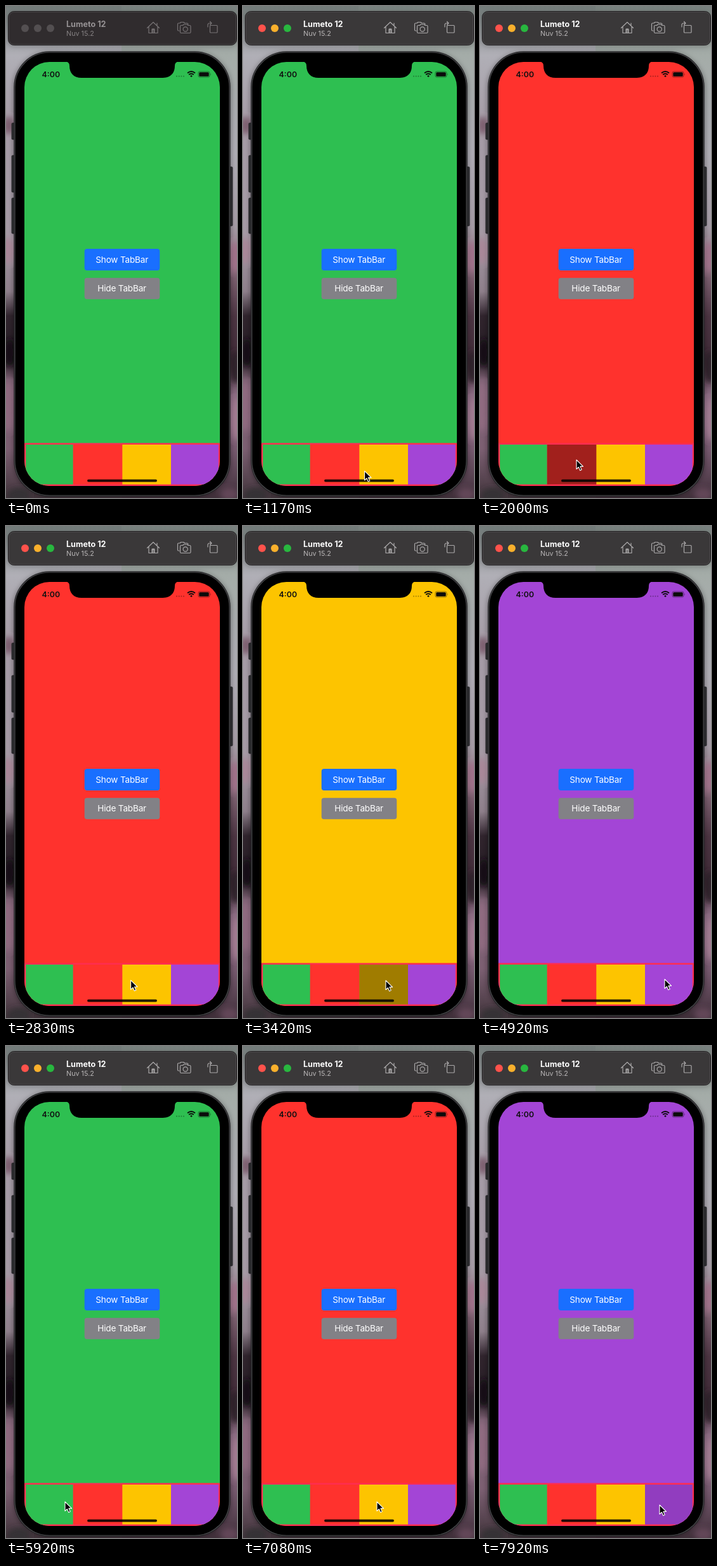
These frames come from a looping animation (364x774 px, 8000 ms). An HTML page:

```html
<!DOCTYPE html>
<html lang="en">
<head>
<meta charset="utf-8">
<title>Tab bar demo</title>
<style>
  html, body { margin: 0; width: 100%; height: 100%; overflow: hidden; background: #8d878c; }
  svg { display: block; width: 364px; height: 774px; font-family: Inter, Roboto, sans-serif; }
</style>
</head>
<body>
<svg viewBox="0 0 364 774">
  <defs>
    <linearGradient id="left" x2="0" y2="1">
      <stop offset="0" stop-color="#727b79"/>
      <stop offset=".1" stop-color="#b0afb6"/>
      <stop offset=".24" stop-color="#a69ca7"/>
      <stop offset=".46" stop-color="#a59aa5"/>
      <stop offset=".58" stop-color="#8f808c"/>
      <stop offset=".63" stop-color="#30242d"/>
      <stop offset=".72" stop-color="#251c23"/>
      <stop offset=".76" stop-color="#7c6073"/>
      <stop offset=".9" stop-color="#7c5f72"/>
      <stop offset="1" stop-color="#41343b"/>
    </linearGradient>
    <linearGradient id="right" x2="0" y2="1">
      <stop offset="0" stop-color="#77807d"/>
      <stop offset=".1" stop-color="#a4aca8"/>
      <stop offset=".3" stop-color="#afadb5"/>
      <stop offset=".45" stop-color="#a59ba5"/>
      <stop offset=".52" stop-color="#8f7081"/>
      <stop offset=".63" stop-color="#4d3543"/>
      <stop offset=".72" stop-color="#402b37"/>
      <stop offset=".79" stop-color="#8b6b82"/>
      <stop offset=".9" stop-color="#785a70"/>
      <stop offset="1" stop-color="#40303a"/>
    </linearGradient>
    <filter id="soft" x="-20%" y="-20%" width="140%" height="140%"><feGaussianBlur stdDeviation="4"/></filter>
    <clipPath id="glass"><rect x="29" y="88" width="308" height="667" rx="39.500"/></clipPath>
  </defs>

  <rect width="182" height="774" fill="url(#left)"/>
  <rect x="182" width="182" height="774" fill="url(#right)"/>
  <g filter="url(#soft)">
    <ellipse cx="4" cy="188" rx="8" ry="14" fill="#7d5f70"/>
    <ellipse cx="2" cy="385" rx="10" ry="20" fill="#a98799"/>
    <ellipse cx="6" cy="545" rx="10" ry="22" fill="#151015"/>
    <ellipse cx="2" cy="630" rx="12" ry="40" fill="#8f6b80"/>
    <ellipse cx="362" cy="395" rx="9" ry="24" fill="#a0728a"/>
    <ellipse cx="362" cy="568" rx="9" ry="26" fill="#2d2029"/>
    <ellipse cx="364" cy="650" rx="9" ry="34" fill="#a27c92"/>
    <ellipse cx="20" cy="770" rx="18" ry="12" fill="#343234"/>
    <ellipse cx="352" cy="768" rx="14" ry="10" fill="#634759"/>
    <rect x="12" y="73" width="342" height="699" rx="56" fill-opacity=".4"/>
    <rect x="3" y="10" width="360" height="53" rx="9" fill-opacity=".25"/>
  </g>

  <g id="toolbar">
    <rect x="3.500" y="8.500" width="360" height="53" rx="9" stroke="#1c1a1b"/>
    <rect x="4.500" y="9.500" width="358" height="51" rx="8" fill="none" stroke="#5b585a" stroke-opacity=".6"/>
    <g id="lights"></g>
    <text id="title" x="95" y="33" font-size="12.600" font-weight="700">Lumeto 12</text>
    <text id="subtitle" x="95" y="47" font-size="10.800">Nuv 15.2</text>
    <g id="icons" fill="none" stroke-width="1.200" stroke-linejoin="round" stroke-linecap="round">
      <path d="M222.500 34.500L232 25.500L241.500 34.500M225 33V42.500H239V33M238 27V30.500"/>
      <path d="M230.500 42V36.500H233.500V42" stroke-width="2"/>
      <path d="M273 39H272Q270.500 39 270.500 37.500V28.500Q270.500 27 272 27H274L275.500 25.500H280L281.500 27H285.500Q287 27 287 29"/>
      <path d="M276 30.500H278.500L280 29H285.500L287 30.500H289.500Q291 30.500 291 32V41Q291 42.500 289.500 42.500H276Q274.500 42.500 274.500 41V32Q274.500 30.500 276 30.500Z"/>
      <circle cx="282.700" cy="36.500" r="3.600"/>
      <rect x="321.500" y="30.500" width="11.500" height="11.500" rx="1"/>
      <path d="M318 33V30Q318 27 321 27H324M321.500 24.500L324 27L321.500 29.500"/>
    </g>
  </g>

  <g fill="#2c2c2f" stroke="#1b1b1d" stroke-width=".7">
    <rect x="9" y="184" width="6" height="26" rx="1.500"/>
    <rect x="9" y="235" width="6" height="58" rx="1.500"/>
    <rect x="9" y="302" width="6" height="56" rx="1.500"/>
    <rect x="351" y="253" width="6" height="93" rx="1.500"/>
  </g>
  <rect x="12.300" y="71.300" width="341.400" height="700.400" rx="56" fill="#222224"/>
  <rect x="14" y="73" width="338" height="697" rx="54.500" stroke="#48484b" stroke-width="1.200"/>

  <g clip-path="url(#glass)">
    <rect id="page" x="29" y="88" width="308" height="667"/>
    <rect x="29" y="687.500" width="308" height="67.500" fill="#ff2d50"/>
    <g id="tabs"></g>
    <rect id="dim" y="690" height="62.600"/>
    <rect x="128" y="744.700" width="110" height="4" rx="2" fill="#000" fill-opacity=".85"/>
  </g>
  <path d="M94 87.500Q100 88 100 94C100 106 107 113 119 113H247C259 113 266 106 266 94Q266 88 272 87.500Z"/>

  <text x="56.500" y="112" font-size="12.400" font-weight="600" fill="#101010">4:00</text>
  <g fill="#000" fill-opacity=".35">
    <circle cx="269" cy="110.500" r="1"/><circle cx="272.700" cy="110.500" r="1"/>
    <circle cx="276.400" cy="110.500" r="1"/><circle cx="280" cy="110.500" r="1"/>
  </g>
  <g fill="none" stroke="#0b0b0b" stroke-width="1.900">
    <path d="M286 105.500Q292 100.500 298 105.500M288.200 108Q292 104.800 295.800 108"/>
    <path d="M292 111.500L290.700 110Q292 109 293.300 110Z" stroke-width="1" fill="#0b0b0b"/>
  </g>
  <rect x="303" y="103" width="18" height="9" rx="2.600" fill="none" stroke="#000" stroke-opacity=".4"/>
  <rect x="304.300" y="104.300" width="15.400" height="6.400" rx="1.500" fill="#0b0b0b"/>
  <path d="M322.300 106V109.200Q323.600 107.600 322.300 106Z" fill-opacity=".5"/>

  <rect x="123.700" y="382" width="118.600" height="34" rx="4" fill="#196fff"/>
  <rect x="123.700" y="427.800" width="118.600" height="33.500" rx="4" fill="#828186"/>
  <g fill="#fff" font-size="13.600" letter-spacing="-.2" text-anchor="middle">
    <text x="182.700" y="404">Show TabBar</text>
    <text x="182.700" y="449">Hide TabBar</text>
  </g>

  <path id="cursor" d="M0 0V14.500L3.400 11.400L5.700 16.700L8.200 15.600L5.900 10.400H10.500Z" stroke="#fff" stroke-width="1.100" stroke-linejoin="round"/>
</svg>
<script>
const LOOP = 8000, WAKE = 1000;
const colors = ['#2ebf51', '#ff322d', '#fdc400', '#a345d6'];
const edges = [31.3, 105.8, 183.3, 260, 334.8];
const lamps = ['#ff524b', '#f9b02c', '#28b73f'];

// [time, tab]
const taps = [[1920, 1], [3340, 2], [4350, 3], [5350, 0], [6300, 1], [7160, 2], [7660, 3]];

// [time, x, y] of the pointer tip
const path = [
  [700, 330, 782], [1350, 160, 720], [1800, 152, 714], [2400, 152, 714],
  [3150, 225, 715], [3700, 225, 715], [4200, 291, 713], [4920, 291, 713],
  [5300, 75, 720], [5550, 75, 720], [5920, 93, 717], [6250, 145, 718],
  [6500, 145, 718], [7080, 211, 717], [7280, 214, 718], [7600, 283, 722], [8000, 283, 722]
];

const $ = id => document.getElementById(id);
const clamp = v => Math.max(0, Math.min(1, v));
const ease = v => v * v * (3 - 2 * v);

function add(parent, tag, attrs) {
  const el = document.createElementNS('http://www.w3.org/2000/svg', tag);
  return parent.appendChild(set(el, attrs));
}
function set(el, attrs) {
  for (const key in attrs) el.setAttribute(key, attrs[key]);
  return el;
}

const lights = lamps.map((_, i) => add($('lights'), 'circle', { cx: 30 + 20 * i, cy: 35, r: 6 }));
colors.forEach((fill, i) => add($('tabs'), 'rect', {
  x: edges[i], y: 690, width: edges[i + 1] - edges[i], height: 62.6, fill
}));

function pointer(t) {
  const i = path.findIndex(p => p[0] > t);
  if (i < 1) return null;
  const [t0, x0, y0] = path[i - 1], [t1, x1, y1] = path[i];
  const k = ease((t - t0) / (t1 - t0));
  return [x0 + (x1 - x0) * k, y0 + (y1 - y0) * k];
}

function render(t) {
  const active = t >= WAKE;
  lights.forEach((el, i) => set(el, { fill: active ? lamps[i] : '#534f51' }));
  set($('toolbar').firstElementChild, { fill: active ? '#3a3839' : '#302c2e' });
  set($('title'), { fill: active ? '#fff' : '#969294' });
  set($('subtitle'), { fill: active ? '#b8b5b6' : '#858183' });
  set($('icons'), { stroke: active ? '#aaa8a9' : '#777375' });

  const [start, tab] = taps.filter(tap => tap[0] <= t).pop() || [-LOOP, 0];
  const age = t - start;
  set($('page'), { fill: colors[tab] });
  set($('dim'), {
    x: edges[tab],
    width: edges[tab + 1] - edges[tab],
    opacity: 0.37 * clamp(age / 40) * clamp((320 - age) / 200)
  });

  const tip = pointer(t);
  set($('cursor'), tip
    ? { visibility: 'visible', transform: `translate(${tip})` }
    : { visibility: 'hidden' });
}

const begin = performance.now();
function tick() {
  render((performance.now() - begin) % LOOP);
  requestAnimationFrame(tick);
}
tick();
</script>
</body>
</html>
```
